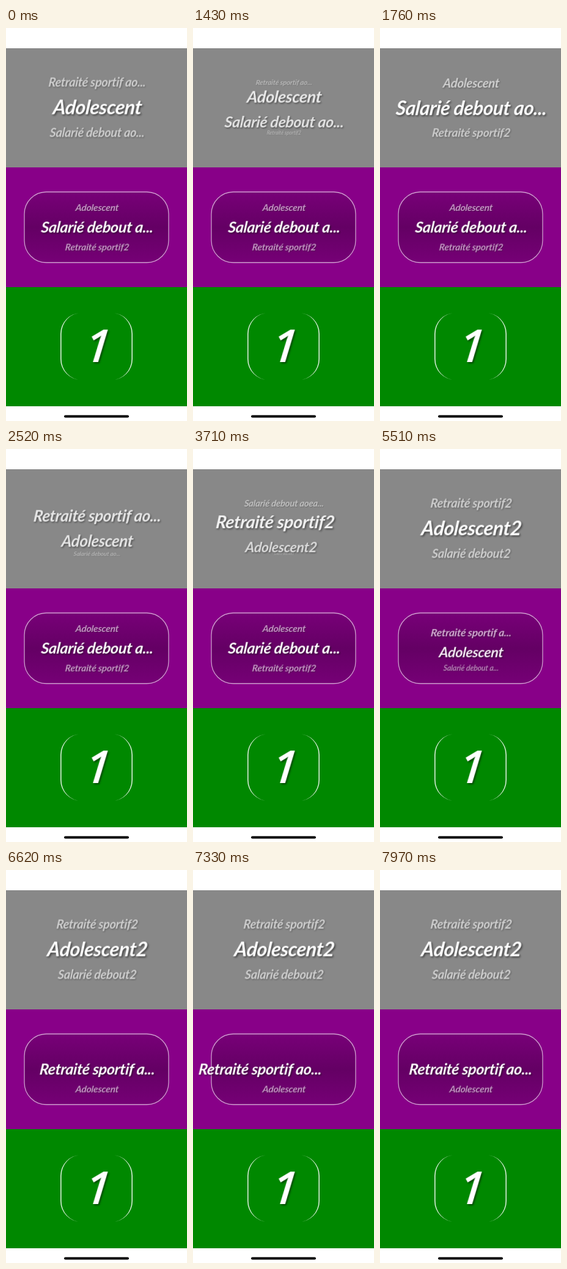
Animation, 296 px wide and 640 px high, one loop 8000 ms. Source, as an HTML page:

```html
<!DOCTYPE html>
<html lang="fr">
<head>
<meta charset="utf-8">
<title>Roues de texte</title>
<style>
  html, body { margin: 0; width: 100%; height: 100%; overflow: hidden; background: #fff; }
  svg { display: block; width: 100vw; height: 100vh; }
  text {
    fill: #fff;
    font: italic 700 32px Lato, sans-serif;
    letter-spacing: -.4px;
    text-anchor: middle;
    filter: drop-shadow(2px 2px 1.5px rgba(0, 0, 0, .5));
  }
  .digit { font: italic 600 74px "Open Sans", sans-serif; letter-spacing: 0; }
</style>
</head>
<body>
<svg viewBox="0 0 296 640">
  <defs>
    <linearGradient id="well" x2="0" y2="1">
      <stop offset="0" stop-color="#780078"/>
      <stop offset=".5" stop-color="#640064"/>
      <stop offset="1" stop-color="#760076"/>
    </linearGradient>
  </defs>
  <rect width="296" height="640" fill="#fff"/>
  <rect y="33" width="296" height="194" fill="#888"/>
  <rect y="227" width="296" height="195" fill="#808"/>
  <rect y="422" width="296" height="194" fill="#080"/>
  <rect x="30" y="267" width="236" height="115" rx="36" fill="url(#well)" stroke="#fff" stroke-opacity=".62" stroke-width="1.3"/>
  <!-- side borders that taper towards the top and bottom -->
  <path fill="#fff" fill-opacity=".85" fill-rule="evenodd" d="
    M123 464H173A34 34 0 0 1 207 498V539A34 34 0 0 1 173 573H123A34 34 0 0 1 89 539V498A34 34 0 0 1 123 464Z
    M123 464H173A32.4 34 0 0 1 205.4 498V539A32.4 34 0 0 1 173 573H123A32.4 34 0 0 1 90.6 539V498A32.4 34 0 0 1 123 464Z"/>
  <g id="wheels"></g>
  <text class="digit" transform="translate(148 544) skewX(-5)">1</text>
  <rect x="95" y="630.5" width="106" height="4" rx="2" fill="#000"/>
</svg>
<script>
const LOOP = 8000, STEP = 41, SIDE = .62;
const root = document.getElementById('wheels');

// [start ms, end ms, redraws, from, to, ease-out power]
const greyPos = [
  [1430, 1980, 6, 1, 2, 3],
  [2290, 2980, 7, 2, 0, 2.5],
  [3460, 4160, 7, 0, 4, 3]
];
const greySlide = [
  [3460, 3693, 3, 0, -20, 2],
  [3810, 4160, 4, -20, 0, 2]
];
const purplePos = [
  [4600, 5170, 6, 2, 1, 3],
  [5390, 6170, 8, 1, .53, 2],
  [6290, 6620, 4, .53, 0, 3]
];
const purpleSlide = [
  [6980, 7430, 5, 0, -41, 2],
  [7545, 7770, 3, -41, -21, 2],
  [7870, 7970, 2, -21, -1, 2]
];

function valueAt(moves, t) {
  let value = moves[0][3];
  for (const [start, end, n, from, to, power] of moves) {
    if (t < start) break;
    const k = Math.floor((t - start) / (end - start) * (n - 1) + .03);
    const u = Math.min(1, (k + 1) / n);
    value = from + (to - from) * (1 - (1 - u) ** power);
  }
  return value;
}

function makeWheel(labels, cy, zoom) {
  const items = labels.map(label => {
    const el = document.createElementNS('http://www.w3.org/2000/svg', 'text');
    el.textContent = label;
    return root.appendChild(el);
  });
  return (pos, slide) => items.forEach((el, i) => {
    const offset = i - pos, d = Math.abs(offset);
    el.style.display = d < 1.95 ? '' : 'none';
    if (d >= 1.95) return;
    const scale = zoom * (d < 1 ? 1 - (1 - SIDE) * d : SIDE * (2 - d));
    const x = 148.5 + slide * Math.max(0, 1 - d);
    const y = cy + zoom * STEP * Math.max(-1, Math.min(1, offset));
    el.setAttribute('transform', `translate(${x} ${y}) scale(${scale}) translate(0 10.5) skewX(-6)`);
    el.setAttribute('opacity', 1 - .4 * d);
    el.textContent = labels[i];
  });
}

const greyLabels = ['Retraité sportif ao...', 'Adolescent', 'Salarié debout ao...',
  'Retraité sportif2', 'Adolescent2', 'Salarié debout2'];
const purpleLabels = ['Retraité sportif a...', 'Adolescent', 'Salarié debout a...', 'Retraité sportif2'];
const drawGrey = makeWheel(greyLabels, 130, 1);
const drawPurple = makeWheel(purpleLabels, 325, .785);

function render(t) {
  // sliding a wheel sideways leaves room for more letters
  greyLabels[2] = t < 3460 ? 'Salarié debout ao...' : 'Salarié debout aoea...';
  purpleLabels[0] = t < 6980 ? 'Retraité sportif a...' : 'Retraité sportif ao...';
  drawGrey(valueAt(greyPos, t), valueAt(greySlide, t));
  drawPurple(valueAt(purplePos, t), valueAt(purpleSlide, t));
}

const origin = performance.now();
function tick() {
  render((performance.now() - origin) % LOOP);
  requestAnimationFrame(tick);
}
tick();
</script>
</body>
</html>
```
